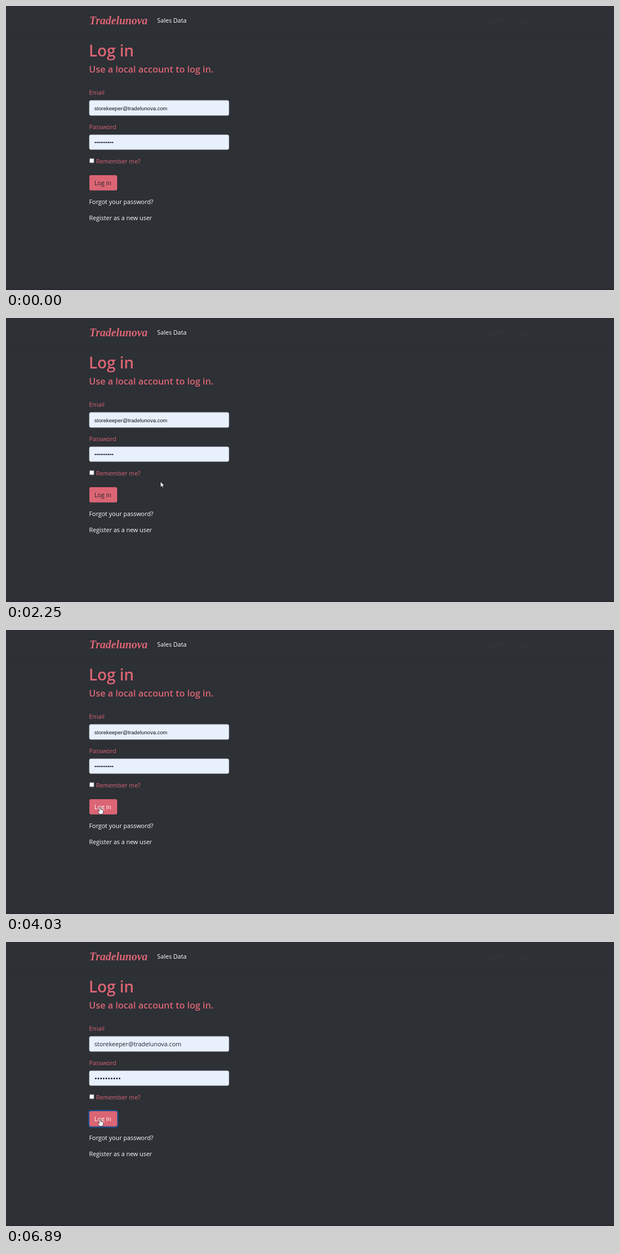
Recreate the animation shown at these times as an HTML page. Size 1094 by 512 pixels, loop 8000 ms.

```html
<!DOCTYPE html>
<html lang="en">
<head>
<meta charset="utf-8">
<title>Log in</title>
<style>
  html, body { margin: 0; width: 100%; height: 100%; overflow: hidden; background: #2d3035; }
  svg { display: block; width: 100%; height: 100%; }
  text { font: 10.9px "Open Sans", "Noto Sans", sans-serif; fill: #fff; white-space: pre; }
  .pink { fill: #db6574; }
  .dim { fill: #343a40; }
  .brand { font: italic bold 20px "Liberation Serif", serif; }
  .title { font-size: 28.2px; font-weight: 600; }
  .lead { font-size: 16.4px; font-weight: 600; }
  .field { fill: #e8f0fe; stroke: #ced4da; stroke-width: .7; }
  .dots { stroke: #15181c; stroke-linecap: round; }
  #email { fill: #212529; }
  #email.preview { font: 9.6px "Liberation Sans", Arial, sans-serif; fill: #111; }
  .cursor { fill: #fff; stroke: #15171a; stroke-width: .7; stroke-linejoin: round; }
</style>
</head>
<body>
<svg viewBox="0 0 1094 512">
  <defs>
    <linearGradient id="shade" x2="0" y2="1">
      <stop stop-opacity=".05"/>
      <stop offset="1" stop-opacity="0"/>
    </linearGradient>
  </defs>
  <rect width="1094" height="512" fill="#2d3035"/>
  <rect y="50" width="1094" height="9" fill="url(#shade)"/>
  <rect y="510" width="1094" height="2" fill="#27292e"/>

  <text class="pink brand" x="150" y="33">Tradelunova</text>
  <text x="272" y="30">Sales Data</text>
  <text class="dim" x="859.5" y="30">Register</text>
  <text class="dim" x="911.5" y="30">Login</text>

  <text class="pink title" x="149" y="91">Log in</text>
  <text class="pink lead" x="149.3" y="119.6">Use a local account to log in.</text>
  <path d="M150 134.5H401" stroke="#000" stroke-opacity=".06"/>

  <text class="pink" x="149.5" y="160">Email</text>
  <rect class="field" x="150" y="170.2" width="251" height="27" rx="2.8"/>
  <text id="email" y="188" x="159">storekeeper@tradelunova.com</text>

  <text class="pink" x="149.5" y="222">Password</text>
  <rect class="field" x="150" y="232.2" width="251" height="26.6" rx="2.8"/>
  <path class="dots" id="dots"/>

  <rect x="150.4" y="275" width="7.8" height="7.8" rx="1" fill="#fff" stroke="#767676" stroke-width=".7"/>
  <text class="pink" x="162" y="283.7">Remember me?</text>

  <rect id="ring" x="148.9" y="303.9" width="52.2" height="29.6" rx="3.8"
        fill="none" stroke="#007bff" stroke-opacity=".42" stroke-width="2.3"/>
  <rect class="pink" x="150" y="305" width="50" height="27.4" rx="2.8"/>
  <text id="submit" x="159" y="323.3">Log in</text>

  <text x="149.5" y="357">Forgot your password?</text>
  <text x="149.5" y="386">Register as a new user</text>

  <circle id="click" cx="168.7" cy="319" r="9" fill="#ffd000"/>
  <g id="pointer" class="cursor">
    <path id="arrow" d="M0 0V9.7L2.2 7.7L3.7 11L5.2 10.3L3.8 7.2H6.8Z"/>
    <path id="hand" d="M-1.2 1.2Q0-.6 1.2 1.2V4.6L2.9 4.7L4.5 5.2Q6 5.6 6 7V9.4Q5.8 11 5 13H-.9Q-2 10.6-4 8Q-3.6 6.4-2.2 7.2L-1.2 8.2Z"/>
  </g>
</svg>
<script>
const LOOP = 8000;
const $ = id => document.getElementById(id);
const show = (id, on) => $(id).style.display = on ? "" : "none";
const clamp = v => Math.max(0, Math.min(1, v));
const ease = p => p * p * (3 - 2 * p);
const mix = (a, b, p) => a + (b - a) * p;

// Each move: first step, last step, number of steps, destination
const start = [925, 514];
const moves = [
  [650, 910, 5, [636.5, 406.5]],
  [1310, 1520, 4, [407.5, 344]],
  [1910, 2250, 6, [278, 295]],
  [3370, 3770, 7, [185.7, 326]],
  [3835, 3900, 2, [164.5, 322]],
  [3965, 4030, 2, [169, 319]]
];

function position(t) {
  let at = start;
  for (const [from, to, steps, end] of moves) {
    if (t < from) break;
    const step = Math.floor((t - from) / (to - from) * (steps - 1) + 1.001);
    const p = ease(clamp(step / steps));
    at = at.map((v, i) => mix(v, end[i], p));
  }
  return at;
}

function draw(t) {
  const [x, y] = position(t);
  const focused = t >= 5090;
  const loading = t >= 5220 && t < 6890;
  const overButton = t >= 3700 && !loading;

  show("pointer", t >= 650);
  $("pointer").setAttribute("transform", `translate(${x} ${y})`);
  show("arrow", !overButton);
  show("hand", overButton);

  const hover = clamp((t - 3700) / 150);
  $("submit").style.fill = `rgb(${[33, 37, 41].map(c => Math.round(mix(c, 255, hover)))})`;

  show("ring", focused);
  $("email").setAttribute("class", focused ? "" : "preview");
  const gap = focused ? 4.75 : 3.45;
  $("dots").setAttribute("d", `M${focused ? 161.5 : 160.7} 246h${gap * 9 + .1}`);
  $("dots").setAttribute("stroke-dasharray", `0 ${gap}`);
  $("dots").setAttribute("stroke-width", focused ? 3 : 2.5);

  const fade = Math.floor((t - 5020) / 66.6);
  show("click", t >= 5020 && t < 5220);
  $("click").setAttribute("opacity", .62 * (1 - fade / 3));
}

const begin = performance.now();
function tick() {
  draw((performance.now() - begin) % LOOP);
  requestAnimationFrame(tick);
}
tick();
</script>
</body>
</html>
```
